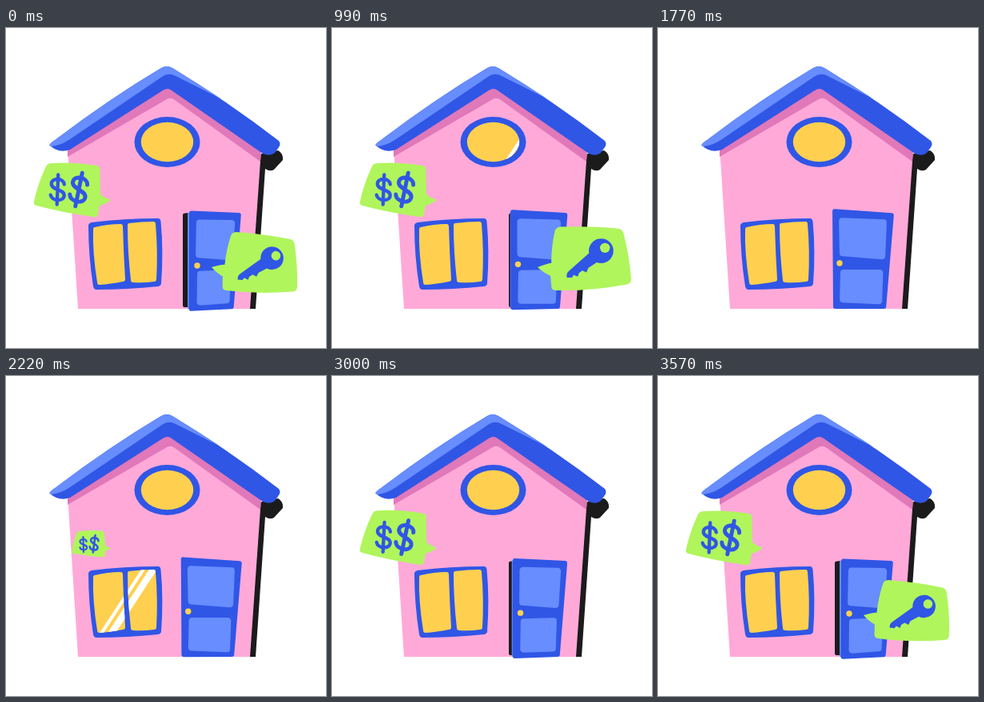
Recreate the animation shown at these times as an HTML page with a canvas. Size 400 by 400 pixels, loop 3.6 s.

```html
<!DOCTYPE html>
<html lang="en">
<head>
<meta charset="utf-8">
<title>House for sale</title>
<style>
  html, body { margin: 0; width: 100%; height: 100%; overflow: hidden; background: #fff; }
  canvas { display: block; width: 400px; height: 400px; }
</style>
</head>
<body>
<canvas id="stage" width="400" height="400"></canvas>
<script>
const ctx = document.getElementById('stage').getContext('2d');
const LOOP = 3600;
const BLUE = '#3056e6', LIGHT = '#678dff', PINK = '#ffa9d9', SHADE = '#e078b9';
const YELLOW = '#ffd04f', GREEN = '#b0f55c', BLACK = '#1b1b1b';

const lerp = (a, b, k) => a + (b - a) * k;
const ramp = (t, from, to) => Math.min(1, Math.max(0, (t - from) / (to - from)));
const smooth = (t, from, to) => { const k = ramp(t, from, to); return k * k * (3 - 2 * k); };
const mix = (a, b, k) => a.map((p, i) => [lerp(p[0], b[i][0], k), lerp(p[1], b[i][1], k)]);

// Polygon with rounded corners
function shape(points, r = 0) {
  const n = points.length, [lx, ly] = points[n - 1], [fx, fy] = points[0];
  ctx.beginPath();
  ctx.moveTo((lx + fx) / 2, (ly + fy) / 2);
  points.forEach((p, i) => {
    const q = points[(i + 1) % n];
    ctx.arcTo(p[0], p[1], (p[0] + q[0]) / 2, (p[1] + q[1]) / 2, p[2] ?? r);
  });
  ctx.closePath();
}

function fill(color, points, r) {
  shape(points, r);
  ctx.fillStyle = color;
  ctx.fill();
}

function fillPath(color, d) {
  ctx.fillStyle = color;
  ctx.fill(new Path2D(d));
}

function ellipse(color, x, y, rx, ry = rx) {
  ctx.beginPath();
  ctx.ellipse(x, y, rx, ry, 0, 0, Math.PI * 2);
  ctx.fillStyle = color;
  ctx.fill();
}

// Two slanted stripes crossing x at height y, clipped to the current path
function glare(x, y) {
  ctx.save();
  ctx.clip();
  for (const [offset, width] of [[0, 5], [10, 10]]) {
    const left = x + offset;
    fill('#fff', [[left + 36, y - 55], [left + 36 + width, y - 55],
                  [left - 36 + width, y + 55], [left - 36, y + 55]]);
  }
  ctx.restore();
}

function drawHouse() {
  fillPath(BLACK, 'M316 158 L340 153 Q347 157 346 165 L335 177 Q330 180 324 176 L312 351 L304 351 Z');
  fill(PINK, [[77, 148], [203, 72], [319, 152], [305, 351], [90, 351]]);
  fillPath(SHADE, 'M77 145 L203 70 L319 150 L318 167 L211 90 Q206 86 201 89 L77 161 Z');
  fillPath(BLUE, 'M55 147 L64 138 Q130 88 194 50 Q201 46 208 50 Q276 91 341 141 ' +
    'Q344 145 341 149 L336 156 Q330 161 321 157 L207 78 Q202 74 196 78 L80 152 Q66 157 55 147 Z');
  fillPath(LIGHT, 'M54 147 Q54 144 64 138 Q130 88 194 50 Q201 46 208 50 L270 89 ' +
    'L212 60 Q203 55 195 61 L80 139 Q68 147 57 148 Z');
}

function drawRoundWindow(t) {
  ellipse(BLUE, 201.5, 142.5, 41, 31.5);
  ellipse(YELLOW, 201.5, 142.5, 32.7, 24.7);
  if (t > 400 && t < 1150) glare(170 + (t - 630) * 0.172, 142);
}

function drawWindow(t) {
  fillPath(BLUE, 'M107 243 Q148 238 190 238 Q193 238 193.5 242 Q197 280 194 319 Q194 322 190 323 ' +
    'Q151 327 113 327 Q110 327 109 323 Q103 285 103 247 Q103 244 107 243 Z');
  const panes = [
    'M111 249 Q128 245 143 245 Q146 245 146 248 Q147 282 149 314 Q149 317 146 317 Q130 320 117 321 Q114 321 114 318 Q108 280 109 252 Q109 249 111 249 Z',
    'M154 244 Q170 242 184 242 Q187 242 187 245 Q190 280 188 314 Q188 317 185 317 Q171 319 159 318 Q156 318 156 315 Q152 280 152 247 Q152 244 154 244 Z'
  ];
  for (const d of panes) {
    fillPath(YELLOW, d);
    if (t < 1840 || t > 2700) continue;
    ctx.save();
    ctx.clip(new Path2D(d));
    ctx.beginPath();
    ctx.rect(100, 235, 100, 95);
    glare(195 + (t - 2520) * 0.175, 282);
    ctx.restore();
  }
}

function drawDoor(t) {
  const open = t < 1800 ? 1 - smooth(t, 250, 1650) : smooth(t, 1980, 3560);
  const part = (color, closed, opened, r) => fill(color, mix(closed, opened, open), r);
  fill(BLACK, [[221, 232], [235, 230], [235, 349], [221, 349]], 2);
  part(LIGHT, [[219, 229], [240, 229], [240, 350], [219, 350]],
              [[227, 231], [240, 231], [240, 351], [227, 351]], 1);
  part(BLUE, [[218, 226], [295, 231.5], [285, 351], [219, 351]],
             [[229, 228.5], [294, 231], [284.5, 351], [228.5, 354]], 3);
  part(LIGHT, [[226, 237], [286, 239.5], [284, 289.5], [227, 285]],
              [[238, 239.5], [286.5, 240], [283, 290.5], [237, 287]], 4);
  part(LIGHT, [[228, 302], [281.5, 302], [280, 345.5], [227, 343]],
              [[239, 304], [281, 302], [279.5, 344], [238.5, 347]], 4);
  ellipse(YELLOW, lerp(227, 239, open), lerp(294, 297, open), 3.7);
}

// Pop in, swing and settle, swell, then vanish; pivots on the tail tip
function bubble(t, x, y, enter, swell, peak, exit, draw) {
  const age = (t - enter + LOOP) % LOOP;
  const since = n => (n - enter + LOOP) % LOOP;
  if (age >= since(exit)) return;
  const grow = 1 - (1 - ramp(age, 0, 170)) ** 3;
  const shrink = 1 - ramp(age, since(peak), since(exit)) ** 2;
  const scale = grow * lerp(1, 1.09, smooth(age, since(swell), since(peak))) * shrink;
  const angle = lerp(-4, 6.2, smooth(age, 0, 460)) - 6.2 * smooth(age, 460, 900);
  if (scale <= 0) return;
  ctx.save();
  ctx.translate(x, y);
  ctx.rotate(angle * Math.PI / 180);
  ctx.scale(scale, scale);
  ctx.translate(-x, -y);
  draw();
  ctx.restore();
}

function dollar(x, y, size, tilt) {
  ctx.save();
  ctx.translate(x, y);
  ctx.rotate(tilt);
  ctx.scale(size, size);
  ctx.lineWidth = 4.3;
  ctx.lineCap = 'round';
  ctx.strokeStyle = BLUE;
  ctx.stroke(new Path2D('M8 -7 C7 -15 -8 -15 -8 -7 C-8 1 8.5 -1 8.5 7 C8.5 15 -7 15 -8.5 7 M0 -18.5 V18.5'));
  ctx.restore();
}

function drawPriceBubble() {
  fillPath(GREEN, 'M57 169 Q86 167 113 172 Q117 172 117.5 177 L118 208 Q124 213 131 215 Q125 220 117 222 ' +
    'L115 233 Q114 237 109 236 Q72 231 38 222 Q34 221 35 217 Q40 194 50 173 Q52 169 57 169 Z');
  dollar(64.5, 202, 1, 0.04);
  dollar(91, 202, 1.15, 0.2);
}

function drawKeyBubble() {
  fillPath(GREEN, 'M283 252 Q320 251 350 254 Q355 254 357 259 Q364 286 366 313 Q366 318 361 319 ' +
    'Q318 327 278 326 Q273 326 273 321 L272 309 Q263 305 257 299 Q266 295 273 294 Q273 275 277 257 Q278 253 283 252 Z');
  fillPath(BLUE, 'M320 280 L328 292 L316 300 L314 305 L309 303 L305 306 L304 310 L299 308 L297 311 L291 311 Q290 306 294 303 Z');
  ellipse(BLUE, 331, 280, 14.3);
  ellipse(GREEN, 335.5, 276.5, 5.8);
}

function render(now) {
  const t = now % LOOP;
  ctx.fillStyle = '#fff';
  ctx.fillRect(0, 0, 400, 400);
  drawHouse();
  drawRoundWindow(t);
  drawWindow(t);
  drawDoor(t);
  bubble(t, 131, 215, 2185, 1090, 1380, 1600, drawPriceBubble);
  bubble(t, 257, 299, 3080, 720, 1095, 1310, drawKeyBubble);
}

const start = performance.now();
function loop() {
  render(performance.now() - start);
  requestAnimationFrame(loop);
}
loop();
</script>
</body>
</html>
```
